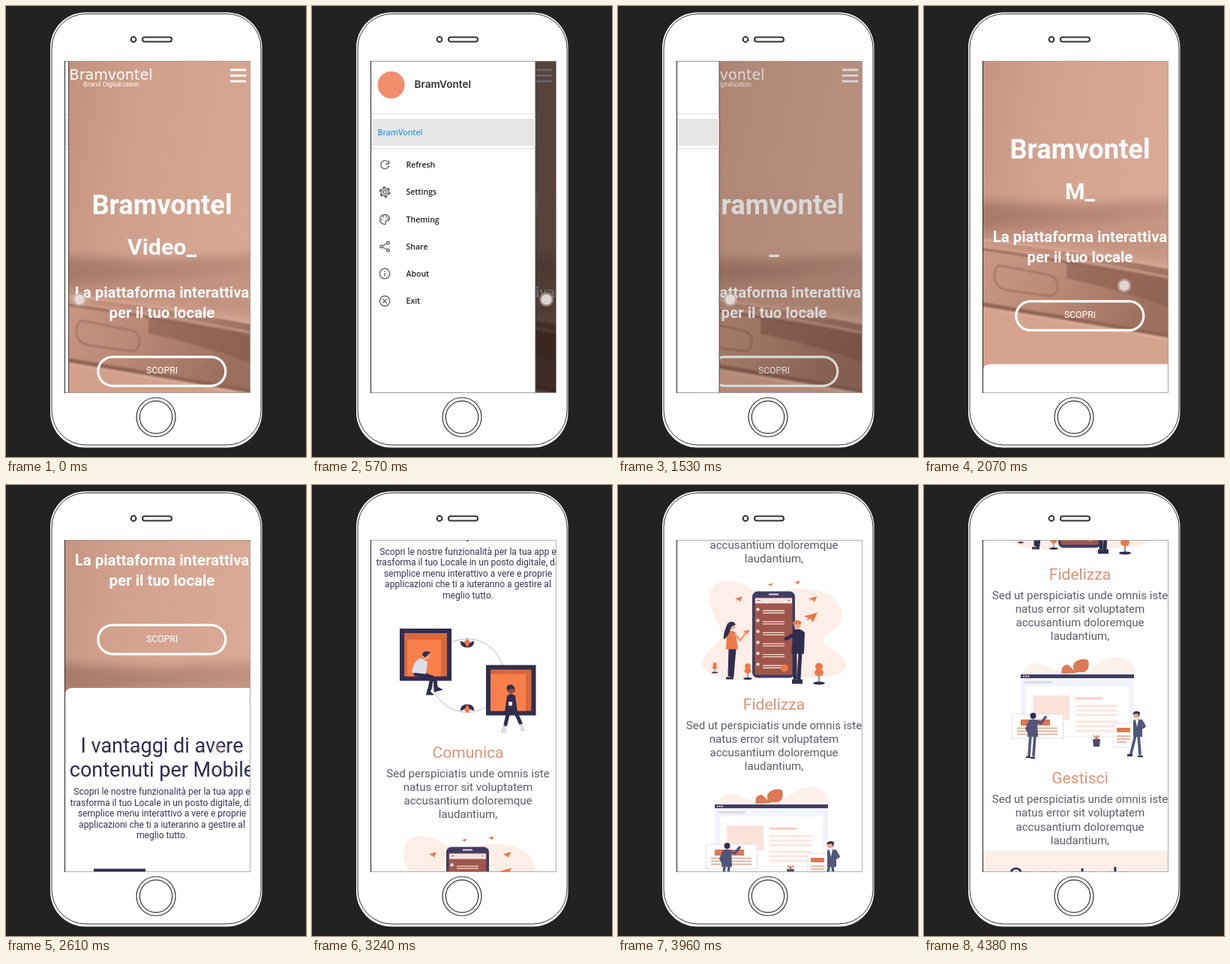
Recreate the animation shown at these times as an HTML page. Size 400 px wide and 600 px high, loop 4.41 s.

```html
<!DOCTYPE html>
<html lang="it">
<head>
<meta charset="utf-8">
<title>App mobile</title>
<style>
html, body { margin: 0; width: 100%; height: 100%; overflow: hidden; background: #222; }
svg { display: block; width: 400px; height: 600px; font-family: Roboto, sans-serif; }
.mid text { text-anchor: middle; }
.hero { font-weight: 700; fill: #fff; }
.title { font-size: 27px; fill: #2e2b50; }
.intro { font-size: 12.1px; fill: #35334f; }
.head { font-size: 21.1px; fill: #dc9376; }
.body { font-size: 15.1px; fill: #5c5b6b; }
.menu { font: 600 10.5px "Open Sans", sans-serif; fill: #222; }
.icons { fill: none; stroke: #666; stroke-width: 1.4; }
.navy { fill: #302e4f; }
.orange { fill: #ee7848; }
.skin { fill: #f0a58a; }
.suit { fill: #50577a; }
.limb { fill: none; stroke: #302e4f; stroke-width: 5; stroke-linecap: round; stroke-linejoin: round; }
.sleeve { fill: none; stroke: #50577a; stroke-width: 3.6; stroke-linecap: round; stroke-linejoin: round; }
</style>
</head>
<body>
<svg viewBox="0 0 400 600">
  <defs>
    <clipPath id="screen"><rect x="78.5" y="73" width="247" height="441.5"/></clipPath>
    <clipPath id="heroBox"><rect x="78" y="73" width="250" height="500"/></clipPath>
    <filter id="soft" x="-20%" y="-50%" width="140%" height="200%"><feGaussianBlur stdDeviation="7"/></filter>
    <filter id="slight"><feGaussianBlur stdDeviation="1.2"/></filter>
    <linearGradient id="wall" x2="1" y2=".5">
      <stop offset="0" stop-color="#c4937f"/><stop offset=".35" stop-color="#d2a28e"/><stop offset="1" stop-color="#dcab97"/>
    </linearGradient>
    <linearGradient id="shade" x2="1" y2=".15">
      <stop offset="0" stop-color="#946a5a" stop-opacity=".7"/><stop offset="1" stop-color="#a87b6a" stop-opacity=".45"/>
    </linearGradient>
    <linearGradient id="metal" x2="1" y2=".3">
      <stop offset="0" stop-color="#cc9a86"/><stop offset=".5" stop-color="#bb8a76"/><stop offset="1" stop-color="#9c6f5f"/>
    </linearGradient>
    <g id="flower">
      <path class="orange" d="M0 6L-6 0 0-6 6 0Z"/>
      <path class="navy" d="M0 6Q-10 5-9-3Q-3-2 0 6Q3-2 9-3Q10 5 0 6Z"/>
    </g>
    <path id="plane" class="orange" d="M-9-1L9-6 3 7-1 2-5 5-4 1Z"/>
    <g id="tree">
      <ellipse class="navy" cy="16" rx="8" ry="2"/>
      <path d="M0-6V16" stroke="#302e4f"/>
      <circle class="orange" cy="-6" r="5"/><ellipse class="orange" cy="2" rx="6" ry="5"/>
    </g>
  </defs>

  <!-- handset -->
  <rect x="59" y="8.5" width="282.5" height="579" rx="47" fill="#fff"/>
  <g fill="none" stroke="#333">
    <rect x="61" y="10.5" width="279" height="573.5" rx="45.5"/>
    <g stroke-width="2"><circle cx="170" cy="44.5" r="3.4"/><rect x="182" y="41.5" width="39" height="6" rx="3"/></g>
    <g stroke-width="1.2"><circle cx="200" cy="547" r="26"/><circle cx="200" cy="547" r="21.7"/></g>
  </g>

  <g clip-path="url(#screen)">
    <g id="page" class="mid">
      <g clip-path="url(#heroBox)"><g id="photo">
        <rect x="78" y="73" width="250" height="700" fill="url(#wall)"/>
        <path d="M60 332L200 338 345 328V350L200 362 60 372Z" fill="url(#shade)" filter="url(#soft)"/>
        <path d="M60 350L345 345V420L200 395 60 380Z" fill="#a87968" opacity=".4" filter="url(#soft)"/>
        <g filter="url(#slight)">
          <path d="M70 384Q190 396 335 424V512Q200 490 70 468Z" fill="url(#metal)"/>
          <path d="M190 414Q260 424 335 440V478Q260 450 190 436Z" fill="#85594a" opacity=".55"/>
          <g fill="none" stroke="#8d6353" stroke-width="2.5">
            <path d="M70 384Q190 396 335 424" stroke="#dbae9b" stroke-width="2"/>
            <path d="M70 396Q190 412 335 441"/>
            <path d="M70 392Q190 407 335 436" stroke="#d2a390" stroke-width="2"/>
            <path d="M70 469Q200 490 335 514" stroke-width="5"/>
            <path d="M70 475Q200 496 335 520" stroke="#dcb09d" stroke-width="2"/>
            <path d="M103 419L165 431Q178 434 178 445Q178 460 166 459L108 451Q92 445 94 430Q96 417 103 419Z" stroke-width="1.5"/>
          </g>
        </g>
        <path d="M70 476Q200 497 335 521V800H70Z" fill="#d5a28d"/>
      </g></g>
      <g fill="#fff">
        <text x="140" y="98" style="font:19.1px 'DejaVu Sans',sans-serif">Bramvontel</text>
        <text x="140.5" y="107" style="font:8.7px 'Liberation Sans',sans-serif">Brand Digitalization</text>
        <path d="M300 85H319M300 92.6H319M300 100.2H319" stroke="#fff" stroke-width="2.8" stroke-linecap="round"/>
        <text class="hero" x="208" y="276.5" font-size="36.3">Bramvontel</text>
        <text class="hero" x="208" y="331" font-size="30.4" id="typed"></text>
        <rect x="122.8" y="466.8" width="170" height="38.5" rx="19.2" fill="none" stroke="#fff" stroke-width="3.2"/>
        <text x="208" y="489.3" font-size="12.2">SCOPRI</text>
      </g>
      <rect x="78" y="550.5" width="270" height="1300" rx="10" fill="#fff"/>

      <g transform="translate(0 599.5)">
        <circle cx="207" cy="254" r="49" fill="none" stroke="#bbb"/>
        <use href="#flower" x="207" y="211"/>
        <use href="#flower" transform="translate(207 298) scale(1 -1)"/>
        <rect class="navy" x="117" y="191.5" width="69" height="69.5"/>
        <rect x="123" y="197.5" width="57" height="57.5" fill="#d9673b"/>
        <path d="M127 206H172V255H127Z" fill="#f97f4b"/>
        <path class="limb" d="M138 252L160 256 157 272M150 252L164 259 165 268" stroke-width="6"/>
        <path class="navy" d="M154 271L163 280 152 280ZM162 266L175 273 163 276Z"/>
        <path d="M146 231Q136 232 133 250L152 252 154 236Z" fill="#dddfe8"/>
        <circle class="skin" cx="152" cy="228" r="4.5"/>
        <path class="navy" d="M147 227Q148 219 158 223L155 226 151 230Z"/>
        <rect class="navy" x="232" y="240" width="66.5" height="67"/>
        <rect x="238" y="246" width="54.5" height="55" fill="#d9673b"/>
        <path d="M238 252H285V301H238Z" fill="#f97f4b"/>
        <path class="limb" d="M262 302L258 319M271 302L278 317" stroke-width="6"/>
        <path d="M256 319L252 329 259 330ZM278 318L279 328 284 326Z" fill="#e3e4ea" stroke="#aab" stroke-width=".5"/>
        <path class="navy" d="M260 281Q266 276 271 281L274 303H257Z"/>
        <circle cx="265" cy="274" r="4.3" fill="#8f4f3e"/>
        <path class="navy" d="M260 274Q258 266 265 266Q272 267 270 277L268 271Z"/>
        <rect x="262" y="289" width="5" height="5" fill="#fff"/>
      </g>

      <g transform="translate(0 939.5)">
        <path d="M122 150C124 124 153 123 172 136C200 152 225 134 252 139C286 140 304 162 297 182C289 199 270 197 274 211C285 222 305 226 304 242C295 264 240 254 215 256C180 260 123 265 113 242C110 222 143 210 138 194C132 177 122 168 122 150Z" fill="#fdeee7"/>
        <rect x="179" y="142" width="57" height="115" rx="7" fill="#3f3d62"/>
        <rect x="182.5" y="150" width="50" height="103" rx="2" fill="#a0574b"/>
        <path d="M183 151H232V158H183Z" fill="#f4e4e1"/>
        <path d="M201 146H214" stroke="#dde" stroke-width="2"/>
        <path d="M185 154H190M226 154H229" stroke="#777"/>
        <g id="chat" fill="#f4dcd6"></g>
        <circle class="orange" cx="222" cy="244" r="5"/>
        <use href="#plane" x="257" y="176"/>
        <g id="planes"></g>
        <use href="#tree" transform="translate(129 242) scale(.5)"/>
        <use href="#tree" transform="translate(173 246) scale(.75)"/>
        <use href="#tree" x="268" y="248"/>
        <path class="limb" d="M150 218L149 253M155 218L152 254" stroke-width="6"/>
        <path class="orange" d="M145 197Q151 192 157 197L160 219H144Z"/>
        <path d="M156 199L163 207 171 197" fill="none" stroke="#f0a58a" stroke-width="3"/>
        <circle class="skin" cx="152" cy="188" r="4.5"/>
        <path class="navy" d="M146 185Q152 179 157 186L151 189Q148 202 141 206Q140 198 146 185ZM144 256H154V259H144Z"/>
        <path class="limb" d="M236 223L236 257M243 223L241 259" stroke-width="7"/>
        <path class="navy" d="M234 193Q244 190 249 197L248 225H231ZM232 259H246V265H232Z"/>
        <path class="limb" d="M237 198L224 205" stroke-width="4"/>
        <circle class="skin" cx="239" cy="187" r="4.5"/>
        <path class="orange" d="M232 185Q237 177 244 182V186Z"/>
      </g>

      <g transform="translate(0 1113)">
        <path d="M137 243C155 226 170 252 200 249C230 249 230 230 257 229C282 229 286 250 276 268C270 288 288 300 278 320C260 340 165 336 140 333C117 319 143 300 136 278C127 263 130 250 137 243Z" fill="#fdf1ec"/>
        <path d="M184 251Q181 240 192 239Q198 245 204 250ZM201 249Q195 237 206 233Q213 230 219 233Q222 246 213 249Z" fill="#dd7955"/>
        <rect x="129" y="252" width="151" height="84" fill="#f3f4f9"/>
        <path d="M129 252H280V257H129Z" fill="#3f3d62"/>
        <path d="M132 254.5H140" stroke="#f7cabb" stroke-width="2" stroke-dasharray="2 1"/>
        <path d="M134 261H170V264H134Z" fill="#d9dce6"/>
        <path d="M136 268H273V334H136Z" fill="#fff"/>
        <path d="M145 280H194V313H145Z" fill="#fbe3da"/>
        <path d="M202 284H238" stroke="#f7cfbf" stroke-width="3"/>
        <path d="M202 294H258M202 300H258M202 306H258M202 315H258M202 321H258M202 327H258" stroke="#fbe6de" stroke-width="3"/>
        <g fill="#fff" stroke="#e0e2ec"><rect x="117.5" y="305" width="68" height="32"/><rect x="253" y="317" width="27" height="32"/></g>
        <path d="M129 312H168V320H129ZM257 323H275V329H257Z" fill="#dd7955"/>
        <path d="M124 323.5H178M124 327.5H178M124 331.5H178M257 334H275M257 338H275M257 342H270" stroke="#e7a084" stroke-width="1.5"/>
        <path class="sleeve" d="M142 333L140 360M148 333L146 360M151 315L156 317 162 309M141 315L137 324 140 330"/>
        <path class="suit" d="M140 313Q145 310 151 313L152 335H138Z"/>
        <circle class="navy" cx="145.5" cy="307" r="4"/>
        <path class="navy" d="M136 361H142V363H136ZM142 362H148V364H142Z"/>
        <path class="sleeve" d="M282 333L276 357M286 333L288 358M290 314L294 321 287 325"/>
        <path class="suit" d="M279 313Q285 310 291 313L291 335H279Z"/>
        <path d="M282 312H286L284 322Z" fill="#fff"/>
        <circle class="skin" cx="283" cy="306" r="4"/>
        <path class="navy" d="M278 305Q280 299 288 302L287 309 285 304ZM271 358H278V361H271ZM285 360H292V362H285Z"/>
        <path d="M225 338H235L234 348H226Z" fill="#4c4b69"/>
        <path d="M230 338L226 333M230 338V333M230 338L234 333" stroke="#dd7955" stroke-width="1.5"/>
        <path d="M78 487H328V600H78Z" fill="#fdeee6"/>
        <text x="112" y="530.5" font-size="31" style="text-anchor:start;fill:#2e2b50">Cosa sta da</text>
      </g>
    </g>

    <rect id="scrim" x="78" y="73" width="248" height="442"/>
    <g id="drawer">
      <path d="M78 73H298.500V515H78Z" fill="#fff" stroke="#444"/>
      <circle cx="106" cy="105" r="18" fill="#f08e6e"/>
      <text x="137" y="109" style="font:600 13.6px Inter,sans-serif" fill="#333">BramVontel</text>
      <path d="M79 143.5H298M79 189.5H298" stroke="#ddd"/>
      <path d="M79 150H298V186H79Z" fill="#e7e7e7"/>
      <text class="menu" x="88" y="172" style="fill:#3695dc">BramVontel</text>
      <g id="items"></g>
      <g class="icons">
        <path d="M102.2 208A5.5 5.5 0 1 0 103 212.5M103 205.5V210H98.5"/>
        <circle cx="97.5" cy="247.5" r="5"/><circle cx="97.5" cy="247.5" r="2.2"/>
        <circle cx="97.5" cy="247.5" r="6.4" stroke-width="2.2" stroke-dasharray="3.35"/>
        <path d="M97.5 277.5A6.5 6.5 0 1 0 97.5 290.5Q100 290 98.5 287Q98.5 285.5 101 285.5Q104 285 104 282.5Q103 278 97.5 277.5Z"/>
        <path d="M93.5 284V284.1M95.5 280.5V280.6M99.5 280.5V280.6M101.5 283V283.1" stroke-width="2" stroke-linecap="round"/>
        <path d="M102 315L93 320 102 325"/>
        <g fill="#fff"><circle cx="102" cy="315" r="1.8"/><circle cx="93" cy="320" r="1.8"/><circle cx="102" cy="325" r="1.8"/></g>
        <circle cx="97.5" cy="356" r="6.7"/><path d="M97.5 355V359.5M97.5 352.3V353.7"/>
        <circle cx="97.5" cy="392.5" r="6.7"/><path d="M94.7 389.7L100.3 395.3M100.3 389.7L94.7 395.3"/>
      </g>
    </g>
    <g id="touch">
      <circle r="9.5" fill="#d8c8c4" opacity=".45"/>
      <circle r="7.3" fill="#e6dedb" opacity=".9" stroke="#a08a84" stroke-width=".8"/>
    </g>
  </g>
  <rect x="78.5" y="73.5" width="247" height="441" fill="none" stroke="#999" stroke-width=".8"/>
  <path d="M78.5 73V515" stroke="#222"/>
</svg>
<script>
const LOOP = 4410;
const $ = id => document.getElementById(id);
const add = (parent, markup) => parent.insertAdjacentHTML('beforeend', markup);
const move = (id, x, y) => $(id).setAttribute('transform', `translate(${x} ${y})`);
const clamp = (v, lo, hi) => Math.min(hi, Math.max(lo, v));
const smooth = u => u * u * (3 - 2 * u);

// Rows of text centred on the page
function block(cls, y, gap, rows, size = '') {
  rows.forEach((row, i) => add($('page'),
    `<text class="${cls}" x="208" y="${y + i * gap}" ${size}>${row}</text>`));
}

// Value at time t through [time, value] keys
function track(keys, t, ease = u => u) {
  const i = keys.findIndex(k => k[0] > t);
  if (i < 0) return keys[keys.length - 1][1];
  if (!i) return keys[0][1];
  const [t0, a] = keys[i - 1], [t1, b] = keys[i];
  return a + (b - a) * ease((t - t0) / (t1 - t0));
}

block('hero', 387.5, 27, ['La piattaforma interattiva', 'per il tuo locale'], 'font-size="20.4"');
block('title', 636.5, 32.5, ['I vantaggi di avere', 'contenuti per Mobile']);
block('intro', 693, 14.4, ['Scopri le nostre funzionalità per la tua app e',
  'trasforma il tuo Locale in un posto digitale, da', 'semplice menu interattivo a vere e proprie',
  'applicazioni che ti a iuteranno a gestire al', 'meglio tutto.']);
const latin = ['natus error sit voluptatem', 'accusantium doloremque', 'laudantium,'];
[['Comunica', 963, 'Sed'], ['Fidelizza', 1238.7, 'Sed ut'], ['Gestisci', 1510.3, 'Sed ut']].forEach(([name, y, start]) => {
  block('head', y, 0, [name]);
  block('body', y + 26, 18.1, [start + ' perspiciatis unde omnis iste', ...latin]);
});

['Refresh', 'Settings', 'Theming', 'Share', 'About', 'Exit'].forEach((label, i) =>
  add($('items'), `<text class="menu" x="126" y="${215 + i * 36.25}">${label}</text>`));
for (let i = 0; i < 6; i++) {
  const y = 166 + i * 14.6;
  add($('chat'), `<circle cx="186.5" cy="${y}" r="2.2"/><path d="M193 ${y + 1}h29v1.3h-29zM193 ${y + 4}h29v1.3h-29z"/>`);
}
[[161, 152, .55], [203, 133, .35], [239, 130, .4], [260, 152, .6], [171, 196, .5]].forEach(([x, y, s]) =>
  add($('planes'), `<use href="#plane" transform="translate(${x} ${y}) scale(${s})"/>`));

const scrollKeys = [[1880, 0], [2070, 73.5], [2610, 280], [3240, 599.5], [3960, 939.5], [4380, 1113]];
const photoKeys = [[1880, 0], [2070, 73.5], [2610, 95]];
const dragKeys = [[0, 98], [600, 314], [1230, 314], [1680, 93]];
const swipeX = [[1880, 262], [2070, 267], [2610, 282]];
const swipeY = [[1880, 445], [2070, 372], [2610, 351]];
const touchAlpha = [[0, 1], [1640, 1], [1720, 0], [1850, 0], [1900, 1], [2150, 1], [2610, .3], [2700, 0]];

function typedText(t) {
  return t < 1900 ? 'Video'.slice(0, clamp(5 - Math.floor((t - 500) / 100), 0, 5))
                  : 'Menu'.slice(0, clamp(Math.floor((t - 1940) / 110), 0, 4));
}

function draw(t) {
  const scroll = track(scrollKeys, t);
  const finger = track(dragKeys, t, smooth);
  const open = clamp(finger - 15, 78, 298) - 78;
  move('page', 0, -scroll);
  move('photo', 0, scroll - track(photoKeys, t));
  move('drawer', open - 220, 0);
  $('drawer').style.display = open > 0 ? '' : 'none';
  $('scrim').setAttribute('opacity', .6 * open / 220);
  $('typed').textContent = typedText(t) + '_';
  if (t < 1800) move('touch', finger, 390.5);
  else move('touch', track(swipeX, t), track(swipeY, t));
  $('touch').setAttribute('opacity', track(touchAlpha, t));
}

const begin = performance.now();
function frame() {
  draw((performance.now() - begin) % LOOP);
  requestAnimationFrame(frame);
}
frame();
</script>
</body>
</html>
```
